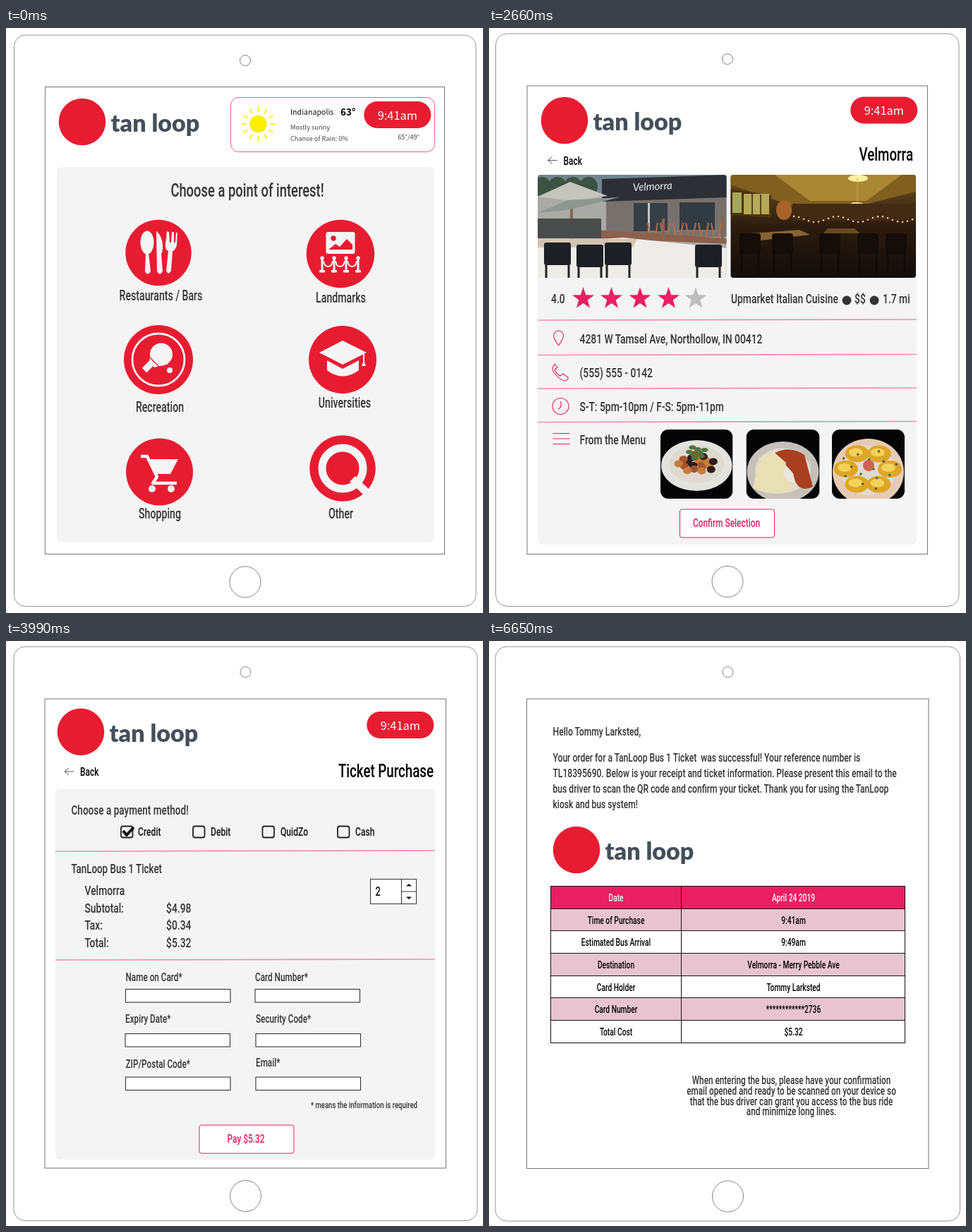
Write an HTML page that moves like this. It is 676 by 829 pixels and loops after 7.98 s.

```html
<!DOCTYPE html>
<html lang="en">
<head>
<meta charset="utf-8">
<title>Transit kiosk walkthrough</title>
<style>
  html, body { margin: 0; width: 100%; height: 100%; overflow: hidden; background: #fff; }
  svg { display: block; }
  .scene { opacity: 0; }
  .tall { font-family: Roboto, "Liberation Sans", sans-serif; font-weight: 500; }
  .ui { font-family: "Noto Sans CJK SC", "Noto Sans CJK JP", "Noto Sans", sans-serif; }
  .brand { font: 900 34px Lato, sans-serif; fill: #454f5b; }
  .road { font: 11.5px Roboto, sans-serif; fill: #555; text-anchor: middle; }
  .area { font: 700 13px Roboto, sans-serif; fill: #7d8ca8; letter-spacing: 2.8px; text-anchor: middle; }
  .stop { font: 6.8px Lato, sans-serif; fill: #222; }
  .line { font: 700 7px Lato, sans-serif; fill: #111; text-anchor: middle; }
</style>
</head>
<body>
<svg id="stage" width="676" height="829" viewBox="0 0 676 829"></svg>
<script>
const STEP = 1330;
const RED = '#e81c31', PINK = '#e91e63', ROSE = '#f48fb1', PANEL = '#f4f4f4',
      PURPLE = '#9c27b0', BLUE = '#3498e8', INK = '#333';
const NARROW = 0.73; // one condensed face for all headings and labels

const rect = (x, y, w, h, fill, r = 0, stroke = 'none', sw = 1) =>
  `<rect x="${x}" y="${y}" width="${w}" height="${h}" rx="${r}" fill="${fill}" stroke="${stroke}" stroke-width="${sw}"/>`;
const circle = (x, y, r, fill, stroke = 'none', sw = 1) =>
  `<circle cx="${x}" cy="${y}" r="${r}" fill="${fill}" stroke="${stroke}" stroke-width="${sw}"/>`;
const oval = (x, y, rx, ry, fill) => `<ellipse cx="${x}" cy="${y}" rx="${rx}" ry="${ry}" fill="${fill}"/>`;
const fill = (d, color) => `<path d="${d}" fill="${color}"/>`;
const line = (d, color, w = 1) =>
  `<path d="${d}" fill="none" stroke="${color}" stroke-width="${w}" stroke-linejoin="round"/>`;
const tall = (x, y, s, size, color = INK, anchor = 'start') =>
  `<text class="tall" transform="translate(${x} ${y}) scale(${NARROW} 1)" font-size="${size}" fill="${color}" text-anchor="${anchor}">${s}</text>`;
const mid = (x, y, s, size, color) => tall(x, y, s, size, color, 'middle');
const end = (x, y, s, size, color) => tall(x, y, s, size, color, 'end');
const ui = (x, y, s, size, color, anchor = 'start', weight = 400) =>
  `<text class="ui" x="${x}" y="${y}" font-size="${size}" fill="${color}" text-anchor="${anchor}" font-weight="${weight}">${s}</text>`;
const label = (kind, x, y, s, turn = 0, extra = '') =>
  `<text class="${kind}" transform="translate(${x} ${y}) rotate(${turn})" ${extra}>${s}</text>`;
const clip = (id, x, y, w, h, r, body) =>
  `<clipPath id="${id}">${rect(x, y, w, h, '#000', r)}</clipPath><g clip-path="url(#${id})">${body}</g>`;
const each = (list, draw) => list.map(draw).join('');
const range = (from, to, step) =>
  Array.from({ length: Math.floor((to - from) / step) + 1 }, (_, i) => from + i * step);

function device(x, y, right, bottom, sx, sy, sRight, sBottom, cx, camY, homeY) {
  return rect(x, y, right - x, bottom - y, '#fff', 16, '#888', .9) +
    rect(sx, sy, sRight - sx, sBottom - sy, '#fff', 0, '#777', 1) +
    circle(cx, camY, 7.5, '#fff', '#777', .9) + circle(cx, homeY, 22, '#fff', '#777', .9);
}
const logo = (x, y) => circle(x, y, 33.3, RED) + `<text class="brand" x="${x + 40.5}" y="${y + 14}">tan loop</text>`;
const clockPill = (x, y) => rect(x, y, 95, 38, RED, 19) + ui(x + 47.5, y + 25.5, '9:41am', 16.4, '#fff', 'middle');
const back = (x, y, gap) =>
  line(`M${x + 13} ${y}h-13m6 -5l-6 5 6 5`, '#444', .9) + tall(x + gap, y + 6, 'Back', 16.3, '#000');
const button = (x, y, w, h, s) =>
  rect(x, y, w, h, '#fff', 3, PINK) + mid(x + w / 2 - 1, y + h / 2 + 5, s, 16.3, PINK);
const pin = (x, y, color) =>
  fill(`M${x} ${y + 11}c-2 -6 -7 -9 -7 -14a7 7 0 0 1 14 0c0 5 -5 8 -7 14z`, color) + circle(x, y - 3, 3.1, '#fff');
function star(x, y, r, color) {
  const points = range(0, 9, 1).map(i => {
    const a = i * Math.PI / 5, d = i % 2 ? r * .4 : r;
    return `${(x + d * Math.sin(a)).toFixed(1)},${(y - d * Math.cos(a)).toFixed(1)}`;
  });
  return `<polygon points="${points.join(' ')}" fill="${color}"/>`;
}

function home() {
  const W = PANEL;
  const sun = circle(357.5, 136, 12.3, '#ffee00') + each(range(0, 330, 30), a =>
    `<path d="M357.5 119v-7.5" stroke="#ffee00" stroke-width="1.8" transform="rotate(${a} 357.5 136)"/>`);
  const weather = rect(318.5, 98.5, 289, 77, '#fff', 11, '#ee5a94') + sun +
    ui(403, 123, 'Indianapolis', 10.6, '#111') + ui(474, 124, '63°', 13.5, '#000', 'start', 700) +
    ui(403, 144, 'Mostly sunny', 9.2, '#444') + ui(403, 160, 'Chance of Rain: 0%', 9.2, '#444') +
    ui(586, 158, '65°/49°', 9.2, '#444', 'end') + clockPill(507.3, 104);
  const cutlery = oval(200, 304, 9.5, 16.5, W) + fill('M198 318h4l3 27q-4 7 -8 0z', W) +
    fill('M213 288c10 7 11 27 7 32l2 25q-4 7 -8 0z', W) +
    fill('M228 288l3 1 1 15h2l1 -15h3v15h2l1 -14 2 0 -1 18q-2 7 -6 8l-2 28q-4 7 -7 0l3 -28q-5 -2 -4 -10z', W);
  const landmark = rect(453.5, 289, 41, 31, W, 3) + circle(464, 298, 3.7, RED) +
    fill('M457 314l10 -8 6 4 10 -11 8 8v7z', RED) +
    each([448, 465, 482, 499], x => circle(x, 326, 2.7, W) + rect(x - 1.5, 328, 3, 16, W) + rect(x - 4, 343, 8, 3.5, W, 1)) +
    each([450, 467, 484], x => line(`M${x} 330q1 8 6.5 8t6.5 -8`, W, 2));
  const paddle = circle(216, 470, 37, 'none', W, 2.8) + oval(220, 462.5, 16, 16, W) +
    fill('M205 456l-2 18 7 7 20 -5z', W) + line('M209 472l-13 13', W, 9) +
    line('M203 466l16 16', RED, 1.5) + circle(232, 485, 4, W);
  const cap = fill('M444 460l33 -17 34 17 -34 17z', W) + fill('M455 471l22 12 23 -12v14q-23 17 -45 0z', W) +
    line('M477 459l30 3v12', W, 2) + fill('M507 471l3 8h-6z', W);
  const cart = line('M191 607h9l14 29 -6 9h34', W, 4.5) + fill('M201 611h43l-11 21h-21z', W) +
    circle(207, 653, 5, W) + circle(234, 653, 5, W);
  const lens = circle(477, 624, 29, 'none', W, 11) + line('M491 639l21 20', W, 11);
  const tiles = [
    [216, 318.5, 46.7, cutlery, 219.5, 386, 'Restaurants / Bars'], [474, 320, 48.3, landmark, 474.5, 389, 'Landmarks'],
    [216, 470, 49, paddle, 218, 544, 'Recreation'], [477, 470, 48, cap, 480, 538, 'Universities'],
    [217.5, 629, 47.5, cart, 218, 695, 'Shopping'], [477, 624, 46.7, lens, 474.5, 695, 'Other']];
  return device(11.5, 10, 666, 819.5, 55.5, 83.5, 621.5, 745.5, 339, 46, 785) + logo(108, 133) + weather +
    rect(72, 197, 534.5, 532, PANEL, 7) + mid(342, 239, 'Choose a point of interest!', 25.2) +
    each(tiles, ([x, y, r, icon, tx, ty, s]) => circle(x, y, r, RED) + icon + mid(tx, ty, s, 19.4));
}

function cityMap() {
  const water = '#aadaff', park = '#c0ecae', white = '#fff';
  const streets =
    each(range(184, 620, 26), x => line(`M${x} ${x < 262 ? 545 : 482}V745`, white, 1.5)) +
    each([545, 578, 653, 690, 735], y => line(`M${y < 600 ? 184 : 120} ${y}H621`, white, 1.8)) +
    each([505, 527], y => line(`M275 ${y}H540`, white, 1.3)) +
    each(range(275, 340, 22), x => line(`M${x} 258V440`, white, 1.5)) +
    each(range(270, 420, 30), y => line(`M263 ${y}H345`, white, 1.5)) +
    each(range(0, 5, 1), i => line(`M57 ${330 + i * 75}q50 -25 85 ${10 - i * 12}t110 -20`, white, 1.5)) +
    each(range(0, 4, 1), i => line(`M${95 + i * 32} 206q-18 70 8 125t-12 150`, white, 1.5)) +
    each(range(0, 4, 1), i => line(`M${80 + i * 28} 745q-8 -55 18 -85t10 -65`, white, 1.5)) +
    line('M300 745q0 -60 20 -90t18 -60M345 745q-5 -70 -30 -95M530 206v80q5 40 91 35M545 206q30 50 76 45M530 345h91M556 345v52', white, 1.6) +
    each(range(548, 600, 7), y => line(`M367 ${y}h27`, white, 1));
  const waters =
    line('M48 440C90 425 108 405 123 384C145 350 140 310 180 276C210 248 245 235 280 239C315 246 335 236 362 246C398 258 412 290 407 320C402 345 374 355 371 388', water, 17) +
    line('M371 370C362 425 395 452 432 452C475 453 498 432 508 402C520 370 517 330 508 296C499 260 490 240 492 200', water, 24) +
    line('M50 692L140 542Q158 521 185 502L255 455Q300 430 362 409', water, 9) +
    fill('M425 309C440 304 446 313 462 307C482 302 484 332 502 352C520 384 490 400 455 405C425 400 406 386 412 360C417 340 409 324 425 309z', water) +
    fill('M428 206H468C475 240 480 270 465 289C449 298 447 270 440 250C430 232 428 220 428 206z', water) +
    fill('M385 240C400 231 417 236 421 252C425 275 415 284 405 272C395 262 379 256 385 240z', water);
  const parks = fill('M283 206H371L358 243Q335 231 300 238L277 231z', park) +
    fill('M522 403L621 399V434H544L540 470H488L497 448z', park) + rect(586, 374, 35, 17, park);
  const roads =
    line('M268 200V300L261 480L264 750', white, 9) + line('M57 375C90 430 92 505 83 545Q75 590 50 612', white, 6) +
    line('M50 596C100 608 140 622 180 623L300 620L470 617L625 619', white, 7) +
    line('M263 456H390Q430 460 465 477H625', white, 7) + line('M50 712L148 550Q170 520 262 456', white, 5) +
    line('M349 456V352L400 310Q430 282 427 255L420 200', white, 6) + line('M488 470L515 443L540 470M515 443v27', white, 2);
  const names = [
    [270, 247, 'N Tamsel Ave', -90], [257, 502, 'N Tamsel Ave', 90], [415, 225, 'moor Blvd', 78],
    [354, 385, 'uillmoor Blvd', -90], [63, 397, 'N Haverlin St', 73], [79, 553, 'N Haverlin St', -60],
    [220, 486, 'E Quillmoor Blvd', -37], [110, 609, 'Morvath Blvd E Dr', 13],
    [322, 624, 'Morvath Blvd E Dr', 0], [489, 622, 'Morvath Blvd E Dr', 0]];
  const areas = [[123, 277, 'ARDEN'], [147, 478, 'WARFLEIGH'], [459, 347, 'OXBOW'],
    [490, 481, 'MERRY PEBBLE'], [315, 684, 'FOREST HILLS']];
  return clip('map', 57.5, 206, 563.5, 539, 0,
    rect(57, 206, 565, 540, '#e8e8e8') + fill('M264 458L335 421L382 434L398 474L385 479L275 468z', '#fdf2dc') +
    streets + parks + waters + roads +
    each(names, ([x, y, s, a]) => label('road', x, y, s, a)) + each(areas, ([x, y, s]) => label('area', x, y, s)) +
    label('road', 498, 287, 'White River', 77, 'style="fill:#4a8fd0"') +
    each(['Merry', 'Pebble Park'], (s, i) => label('road', 560, 409 + i * 14, s, 0, 'style="fill:#3a8a55;font-size:12.5px"')) +
    rect(486, 733, 135, 12, '#f3f3f3') + label('road', 545, 743, 'Map data ©2019 Tervio', 0, 'style="font-size:10.8px"') +
    label('road', 620, 743, 'U'));
}

function places() {
  const tags = [
    [174, 291, 103, 'Soup by the Larch', 288, 306], [323, 325, 81, 'Garden Ladles', 310, 341],
    [221, 376, 72, 'Tarn Bistro', 304, 391], [330, 408, 63, 'Stillreed', 321, 423],
    [281, 582, 62, 'Velmorra', 270, 600], [134, 653, 78, 'You are here!', 223, 666, PURPLE]];
  return device(12.5, 12, 665, 819.5, 57, 85.5, 621.3, 745.5, 339, 48, 785) + logo(109, 132.5) +
    rect(333.5, 106.5, 269.5, 38, RED, 7) + circle(358, 123, 4.7, 'none', '#fff', 1) + line('M361.5 126.5l5 5', '#fff') +
    ui(409, 130, 'Search for a place or address', 11.8, '#fff') + back(85, 184.5, 14) +
    end(600, 191, 'Restaurants / Bars', 26, '#000') + cityMap() +
    each(tags, ([x, y, w, s, px, py, color = RED]) =>
      rect(x, y, w, 30, '#fff', 7) + mid(x + w / 2 + 1, y + 20.5, s, 15.6) + pin(px, py, color)) +
    circle(288, 715, 9, '#4285f4') +
    rect(560, 226, 44, 94, '#fff', 7) + line('M560 272.5h44', '#ddd') + circle(582.5, 249, 9, 'none', BLUE, 1.1) +
    line('M581 247h2v6m-2.5 0h5', BLUE) + circle(582.3, 244, 1, BLUE) +
    line('M589 290l-14 8 6 1 1 6z', BLUE) + rect(546.5, 704, 54, 21.5, '#fff', 5, BLUE) +
    line('M572.5 704v21.5M554 714.7h12M581 714.7h11M586.5 709v11.5', BLUE, 1.3);
}

function patioPhoto() {
  const chairs = each([78, 124, 164, 292], (x, i) =>
    rect(x, 304 + (i % 2) * 3, 38, 32, '#1d1f25', 3) + line(`M${x + 3} 330v26M${x + 35} 330v26`, '#222', 3));
  return clip('patio', 69, 208, 267.5, 146, 4,
    rect(69, 208, 268, 146, '#a9aaa6') + rect(69, 208, 268, 30, '#71868c') +
    each(range(75, 160, 22), x => oval(x, 225, 13, 14, '#3d5242')) +
    rect(166, 236, 171, 60, '#77716d') + fill('M160 214L337 208V240L160 246z', '#2d2f37') +
    rect(205, 248, 48, 40, '#363e46') + rect(270, 247, 50, 39, '#323a42') + rect(225, 248, 3, 40, '#c4c6c5') +
    each(range(225, 315, 18), x => line(`M${x} 276l4 22m10 -22l-4 22m-9 -10h9`, '#b06f4c', 2)) +
    fill('M150 286L337 298V306L130 297z', '#8d604e') + fill('M69 305L190 297L337 312V354H69z', '#eeece8') +
    line('M117 224V300M247 270v32M331 265v38', '#86674f', 4) +
    fill('M69 239L115 218L168 238L115 245z', '#c4c5bd') + fill('M69 262L112 244L185 240L110 258z', '#8e9690') +
    rect(69, 270, 90, 28, '#4a4c4c') + fill('M69 298L210 299L204 311H69z', '#d3c4b1') + chairs +
    `<text x="204" y="231" transform="rotate(-3 204 231)" font-family="Lato, sans-serif" font-style="italic" font-size="15" fill="#eee">Velmorra</text>`);
}

function roomPhoto() {
  return clip('room', 342.5, 208, 262.5, 146, 4,
    rect(342, 208, 264, 146, 'url(#roomTone)') +
    fill('M342 208H605V232L525 252H430L342 222z', '#80601f') + fill('M405 208H585L535 245H455z', '#a98735') +
    oval(523, 213, 14, 5, '#fff0a0') + oval(521, 250, 10, 3, '#ffe99a') + line('M522 213v35', '#c8a64f') +
    fill('M342 228L400 237V269L342 265z', '#4f3012') + rect(345, 233, 13, 29, '#a2a95a') + rect(361, 235, 36, 29, '#b3a958') +
    line('M373 235v29M385 236v28', '#59431c', 2) + oval(418, 258, 11, 14, '#a76329') +
    rect(430, 249, 175, 24, '#432a13') +
    each(range(432, 602, 7), x => circle(x, 271 + 4 * Math.sin(x), 1.2, '#ffd89a')) +
    fill('M372 291L440 286L455 293L385 301z', '#856333') + fill('M480 284h38l8 7h-52z', '#664925') +
    each([355, 401, 468, 522, 562], x => rect(x, 291, 30, 29, '#140d0a', 4) + line(`M${x + 3} 313v38M${x + 27} 313v38`, '#110b08', 3)));
}

function dishes() {
  const plate = (id, x, w, y, ry, tone, food) => clip(id, x, 569, w, 98, 11,
    rect(x, 569, w, 98, '#050505') + oval(x + w / 2, y, w * .49, ry, tone) +
    oval(x + w / 2, y - 2, w * .38, ry * .74, '#dedad0') + food);
  const scatter = (x, y, rx, ry, count, draw) => each(range(0, count - 1, 1), i => {
    const a = i * 2.4, d = Math.sqrt((i + .5) / count);
    return draw(x + rx * d * Math.cos(a), y + ry * d * Math.sin(a), i);
  });
  const salad = scatter(295, 617, 27, 14, 18, (x, y, i) => oval(x, y, 6, 5, ['#a6532d', '#2b1d1c', '#c77c3e'][i % 3])) +
    scatter(295, 602, 15, 9, 8, (x, y) => oval(x, y, 5, 3, '#54713c'));
  const slice = fill('M382 610L407 599L442 610L433 644L391 641z', '#ebe7dc') +
    fill('M405 602Q427 591 447 605L459 650Q436 661 431 631L413 611z', '#a83f20') +
    fill('M383 609L405 602L421 616L417 634L434 652Q410 668 374 652z', '#e9dfb4');
  const pasta = each(range(0, 5, 1), i => {
    const x = 537 + 31 * Math.cos(i * 1.05), y = 625 + 25 * Math.sin(i * 1.05);
    return oval(x, y, 17, 12, '#dda626') + oval(x - 2, y - 2, 10, 6, '#f4d25a');
  }) + circle(538, 620, 8, '#cf6250') + scatter(537, 625, 42, 32, 14, (x, y) => circle(x, y, 1.8, '#4d672a'));
  return plate('dish1', 243, 102.5, 620, 36, '#e4e2dd', salad) + plate('dish2', 364.5, 104, 629, 43, '#c5c1b9', slice) +
    plate('dish3', 486, 103, 629, 47, '#e5cbb5', pasta);
}

function venue() {
  const icons = line('M98.5 450q-7 -10 -7 -14a7 7 0 0 1 14 0q0 4 -7 14z', PINK, 1.1) +
    line('M92 478q-5 5 2 13t14 9q5 -2 4 -5l-7 -5 -4 3q-6 -3 -8 -9l4 -3 -4 -5z', PINK, 1.1) +
    circle(101.5, 536, 11.5, 'none', PINK, 1.1) + line('M102 529v8l-4 3', PINK, 1.2) +
    line('M90.5 574.5h24m-24 7.5h24m-24 7.5h24', PINK, 1.2);
  return device(9.5, 8, 666, 819.5, 54, 82, 621.5, 745.5, 338, 44, 784.5) + logo(107, 131) + clockPill(512.3, 97.5) +
    back(83.5, 187.5, 22) + end(601, 188, 'Velmorra', 25.6, '#000') +
    rect(69, 208, 537, 524, PANEL, 7) + patioPhoto() + roomPhoto() + tall(88, 390, '4.0', 19) +
    each([133.5, 173.5, 214, 254.5, 293], (x, i) => star(x, 383.5, 16.3, i < 4 ? PINK : '#bdbdbd')) +
    tall(343, 390, 'Upmarket Italian Cuisine', 19) + circle(507, 386, 6.5, INK) + tall(518, 390, '$$', 19) +
    circle(546, 386, 6.5, INK) + tall(558, 390, '1.7 mi', 19) +
    each([413.5, 463, 510.5, 558], y => line(`M69 ${y + .5}L606 ${y - .5}`, ROSE, 1.6)) + icons +
    each(['4281 W Tamsel Ave, Northollow, IN 00412', '(555) 555 - 0142', 'S-T: 5pm-10pm / F-S: 5pm-11pm', 'From the Menu'],
      (s, i) => tall(128.5, 447 + i * 47.8, s, 19)) +
    dishes() + button(270.5, 682, 134, 40, 'Confirm Selection');
}

function payment() {
  const methods = [[163, 187, 'Credit'], [265, 290, 'Debit'], [363.5, 389, 'QuidZo'], [470, 495, 'Cash']];
  const sums = [['Velmorra', ''], ['Subtotal:', '$4.98'], ['Tax:', '$0.34'], ['Total:', '$5.32']];
  const fields = [[169.5, 493.5, 482, 'Name on Card*'], [353, 493.5, 482, 'Card Number*'], [169, 556.5, 541, 'Expiry Date*'],
    [354, 556.5, 541, 'Security Code*'], [169.5, 618, 605, 'ZIP/Postal Code*'], [354, 618, 603, 'Email*']];
  return device(11, 8, 668, 821.5, 55, 82, 623.5, 747, 339.5, 44, 786.5) + logo(106, 128.7) + clockPill(511.3, 100) +
    back(83, 185, 22) + end(606, 193, 'Ticket Purchase', 25.6, '#000') + rect(70, 209.5, 538, 525.5, PANEL, 7) +
    tall(92.5, 246, 'Choose a payment method!', 18.6) +
    each(methods, ([x, tx, s]) => rect(x, 262.5, 16.5, 16, 'none', 3, '#222', 1.8) + tall(tx, 276, s, 16.6, '#111')) +
    line('M166 269l5 6 10 -11', '#111', 4) +
    each([297.5, 451.5], y => line(`M70 ${y + .5}L608 ${y - .5}`, ROSE, 1.7)) +
    tall(92.5, 329, 'TanLoop Bus 1 Ticket', 18.3) +
    each(sums, ([s, amount], i) => tall(111.5, 360 + i * 24.5, s, 19) + end(262.5, 360 + i * 24.5, amount, 19)) +
    rect(516.5, 337.5, 65, 35, '#fff', 0, '#333') + line('M560.5 337.5v35M560.5 355h21', '#333') +
    fill('M567 347.5l4 -3.5 4 3.5zM567 362.5l4 3.5 4 -3.5z', '#111') + tall(523.5, 361, '2', 17.5, '#111') +
    each(fields, ([x, y, ty, s]) => tall(x, ty, s, 16.1) + rect(x, y, 148.5, 18.5, '#fff', 0, '#333', 1.1)) +
    end(583, 662, '* means the information is required', 13.1) + button(274, 686, 134, 40, 'Pay $5.32');
}

function route() {
  const right = [
    [350, 223, '66th St.'], [350, 274.5, 'Morvath Blvd.'], [350, 300, '54th St.'], [350, 323, '52nd St.'],
    [350, 345, '46th St.'], [350, 369, '42nd St.'], [307, 500, '18th/Haverlin'], [345, 589, 'Corvane/Tilby', -3.5],
    [361, 601, 'Thornby Place'], [374, 618, 'Lantern Square'], [374, 638, 'Gentle Brook'], [374, 658, 'Welford St.'],
    [374, 677, 'Dunberry Park'], [374, 699, 'Pell Ave.'], [374, 723, 'U Indy']];
  const left = [
    [309, 408, '38th/Haverlin'], [308, 426, '34th St.'], [308, 445, '30th St.'], [308, 462, 'Moss Bend Pkwy'],
    [308, 479, '22nd St.'], [285, 504, '18th/Cordrey'], [284, 520, '14th St.'], [284, 537, '9th St.'],
    [284, 556.5, 'Velland St.'], [285, 573, 'Harrowgate St.']];
  const dot = (x, y) => circle(x, y, 4.8, '#fff', '#333', .9);
  const lines = [[338, 275, 'TAMSEL', 90], [316, 452, 'HAVERLIN', 90], [292, 536, 'CORDREY', 90],
    [337, 598, 'MARGENIA', 42], [362, 657, 'TOLVEY', 90], [322, 401, '38th', 0]];
  return device(10, 8, 668, 821.5, 54.5, 82, 623.5, 747.5, 339, 44, 787) + logo(108, 130.3) + clockPill(513.3, 100.3) +
    back(85, 187, 22) + end(605, 192, 'Your bus will arrive shortly. Thank you!', 24.6, '#000') +
    line('M350 223V406H308V501H285V573H327L361 601L374 613V723', '#e8202a', 5.2) +
    each(right, ([x, y, s, dy = 0]) => dot(x, y) + label('stop', x + 9, y + 2.5 + dy, s)) +
    each(left, ([x, y, s]) => dot(x, y) + label('stop', x - 8.5, y + 2.5, s, 0, 'text-anchor="end"')) +
    dot(336, 406) + label('stop', 335, 418.5, 'Fern Ave.') + dot(327, 575) +
    label('stop', 334, 571, 'Doria P. Welken Transit Center') + label('stop', 359, 252, 'Merry Pebble Ave.') +
    each(lines, ([x, y, s, a]) => label('line', x, y, s, a)) +
    star(349, 248, 16.5, PINK) + tall(421.5, 256, 'Velmorra', 16.4, '#000') +
    pin(308, 400, PURPLE) + mid(282, 382.5, 'You are here!', 16.4, '#000') +
    pin(327, 568, RED) + mid(333.5, 553, 'Bus 1', 16.4, '#000') +
    fill('M199.5 627l11 18.5h-22z', '#000') +
    label('line', 199.5, 661, 'N', 0, 'style="font-size:14px"') + rect(138, 719, 17, 17, '#111') +
    button(466.5, 682.5, 134.5, 46.5, 'End Session');
}

function receipt() {
  const letter = ['Your order for a TanLoop Bus 1 Ticket&#160; was successful! Your reference number is',
    'TL18395690. Below is your receipt and ticket information. Please present this email to the',
    'bus driver to scan the QR code and confirm your ticket. Thank you for using the TanLoop',
    'kiosk and bus system!'];
  const rows = [['Date', 'April 24 2019'], ['Time of Purchase', '9:41am'], ['Estimated Bus Arrival', '9:49am'],
    ['Destination', 'Velmorra - Merry Pebble Ave'], ['Card Holder', 'Tommy Larksted'],
    ['Card Number', '************2736'], ['Total Cost', '$5.32']];
  const notes = ['When entering the bus, please have your confirmation', 'email opened and ready to be scanned on your device so',
    'that the bus driver can grant you access to the bus ride', 'and minimize long lines.'];
  const rowTop = i => Math.floor(347.4 + i * 31.7) + .5;
  return device(9, 8, 667.5, 822, 53.5, 82, 623, 747.5, 338.5, 44, 787) +
    tall(90.5, 134, 'Hello Tommy Larksted,', 16.7) + each(letter, (s, i) => tall(90.5, 171 + i * 22.1, s, 16.6)) +
    logo(124, 296) +
    each(rows, ([name, value], i) => {
      const y = rowTop(i), ink = i ? '#000' : '#fff';
      return rect(87.5, y, 502, rowTop(i + 1) - y, i ? (i % 2 ? '#e8c4d1' : '#fff') : PINK, 0, '#111') +
        mid(180, y + 21.5, name, 14, ink) + mid(431.5, y + 21.5, value, 14, ink);
    }) + line(`M272.5 ${rowTop(0)}V${rowTop(rows.length)}`, '#111') +
    each(notes, (s, i) => mid(428.5, 628 + i * 14.8, s, 16.1));
}

const scenes = [home, places, venue, payment, route, receipt];
const stage = document.getElementById('stage');
stage.innerHTML = `<defs><linearGradient id="roomTone" x2="0" y2="1"><stop stop-color="#6d5020"/>
  <stop offset=".5" stop-color="#2c1c0e"/><stop offset="1" stop-color="#120d0c"/></linearGradient></defs>` +
  each(scenes, draw => `<g class="scene">${draw()}</g>`);

// Each scene is shown for one step, then hidden for the rest of the loop.
const share = 1 / scenes.length, duration = STEP * scenes.length;
stage.querySelectorAll('.scene').forEach((scene, i) => {
  const show = scene.animate(
    [{ opacity: 1 }, { opacity: 1, offset: share }, { opacity: 0, offset: share }, { opacity: 0 }],
    { duration, delay: i * STEP - duration, iterations: Infinity });
  show.startTime = 0;
});
</script>
</body>
</html>
```
